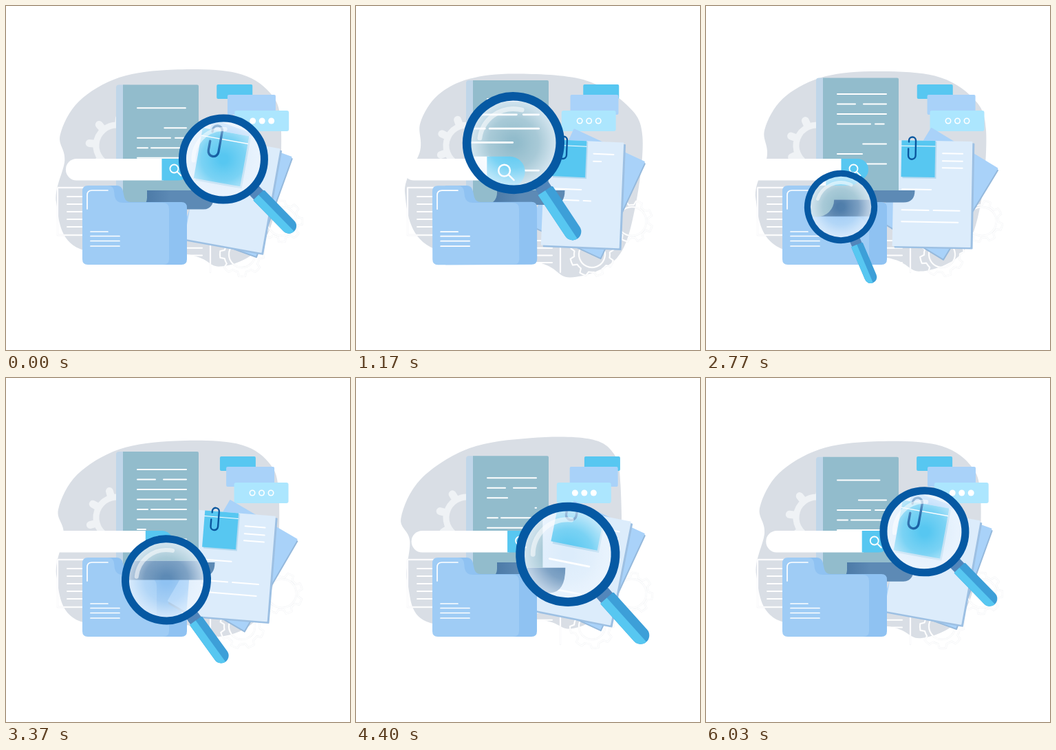
An HTML page with a canvas for the animation above (6.06 s loop, 500x500 px).

```html
<!DOCTYPE html>
<html lang="en">
<head>
<meta charset="utf-8">
<title>Document search</title>
<style>
html, body { margin: 0; width: 100%; height: 100%; overflow: hidden; background: #fff; }
canvas { display: block; width: 500px; height: 500px; }
</style>
</head>
<body>
<canvas id="stage" width="500" height="500"></canvas>
<script>
const LOOP = 6060, TAU = Math.PI * 2, RAD = Math.PI / 180;
const SKY = '#57c7f1', WHITE = '#fff';
const c = document.getElementById('stage').getContext('2d');
let now = 0;

const clamp = v => Math.max(0, Math.min(1, v));

// Oscillation with a whole number of cycles per loop; peak is a phase in degrees.
const sway = (mid, amp, peak, cycles = 1) =>
  mid + amp * Math.cos(cycles * TAU * now / LOOP - peak * RAD);

function fill(color, path) { c.fillStyle = color; c.fill(path); }
function stroke(color, width, path) {
  c.strokeStyle = color; c.lineWidth = width; c.lineCap = c.lineJoin = 'round';
  c.stroke(path);
}
function box(color, x, y, w, h, r = 0) {
  const p = new Path2D();
  p.roundRect(x, y, w, h, r);
  fill(color, p);
}
function disc(x, y, r) {
  const p = new Path2D();
  p.arc(x, y, r, 0, TAU);
  return p;
}
function placed(x, y, degrees, draw) {
  c.save();
  c.translate(x, y);
  c.rotate(degrees * RAD);
  draw();
  c.restore();
}

// A text row of segments, visible between two fractions of its span.
function row(spans, y, from, to, width = 2) {
  const x0 = spans[0][0], size = spans[spans.length - 1][1] - x0;
  for (const [a, b] of spans) {
    const left = Math.max(a, x0 + size * from), right = Math.min(b, x0 + size * to);
    if (right > left) stroke(WHITE, width, new Path2D(`M${left} ${y}H${right}`));
  }
}

// Outline points of the backdrop: x, y and how far each one sways.
const BLOB = [
  [80, 186, 15, -18], [107, 138, 13, -9], [165, 104, 0, 2], [243, 93, -11, 6],
  [334, 98, -4, 10], [384, 127, 10, 18], [401, 173, 17, 18], [395, 285, 12, 8],
  [368, 354, 12, 14], [312, 380, 0, 16], [262, 362, 0, 11], [108, 353, 0, -3],
  [73, 285, -2, -14], [86, 223, 8, -14]
];
function blob() {
  const s = sway(0, 1, 95), n = BLOB.length;
  const at = i => {
    const [x, y, dx, dy] = BLOB[(i + n) % n];
    return [x + dx * s, y + dy * s];
  };
  const p = new Path2D();
  p.moveTo(...at(0));
  for (let i = 0; i < n; i++) {
    const [a, b, d, e] = [at(i - 1), at(i), at(i + 1), at(i + 2)];
    p.bezierCurveTo(b[0] + (d[0] - a[0]) / 6, b[1] + (d[1] - a[1]) / 6,
      d[0] - (e[0] - b[0]) / 6, d[1] - (e[1] - b[1]) / 6, ...d);
  }
  fill('#d9dee5', p);
}

function solidGear() {
  placed(161, 203, 5 - 360 * now / LOOP, () => {
    stroke('#eff2f5', 9, disc(0, 0, 30));
    for (let i = 0; i < 8; i++) {
      c.rotate(TAU / 8);
      stroke('#eff2f5', 11, new Path2D('M34 0H40'));
    }
  });
}
function outline(path) {
  stroke('#eef0f3', 2.4, path);
  stroke(WHITE, 1.6, path);
}
function lineGear(x, y, r, hole, turn) {
  placed(x, y, turn * 360 * now / LOOP, () => {
    const p = new Path2D();
    for (let i = 0; i < 8; i++) {
      const mid = i * TAU / 8;
      p.arc(0, 0, r + 6, mid - .15, mid + .15);
      p.arc(0, 0, r, mid + .24, mid + TAU / 8 - .24);
    }
    p.closePath();
    outline(p);
    outline(disc(0, 0, hole));
  });
}
function backdrop() {
  blob();
  solidGear();
  lineGear(401, 313, 24, 21, -1);
  lineGear(343, 361, 26, 19, 1);
  outline(new Path2D('M130 264H75V333H130M297 340V387'));
  for (let i = 0; i < 5; i++) row([[89, 125]], 277 + i * 11, 0, 1);
  for (let i = 0; i < 4; i++) row([[240, 285]], 341 + i * 10.7, 0, 1);
}

function bubbles() {
  box(SKY, sway(319, 13, 169, 2), 114, 52, 21, 2);
  box('#a9d2f9', sway(316.3, 5.7, -8, 2), 129, 70, 29, 2);
  const x = sway(310.5, 22.8, 18, 2), phase = now % (LOOP / 3);
  box('#ace6fe', x, 152, 79, 30, 3);
  for (let i = 0; i < 3; i++) {
    const cx = x + 26.5 + 13.5 * i, t = phase - 60 * i;
    const open = clamp((t - 400) / 200) - clamp((t - 1350) / 200);
    fill(WHITE, disc(cx, 167, 4.5));
    if (open > 0) fill('#ace6fe', disc(cx, 167, 2.9 * open));
  }
}

function pages() {
  const sheet = (color, shade, dx, dy) => {
    box(shade, dx - 57, dy - 77, 114, 154, 1);
    box(color, -57, -77, 114, 154, 1);
  };
  placed(336, 272, sway(25.5, 5.8, 165), () => sheet('#a9d2f9', '#95b9dc', 2, 2));
  placed(329, 273, sway(6.3, -6.8, 125), () => {
    sheet('#dcecfb', '#9dc0e3', 3, 2.5);
    const gone = clamp((now - 5050) / 850);
    const head = (now - 300) / 630, body = now / 700;
    [-59, -48, -38].forEach((y, i) => row([[14, 43]], y, gone, clamp(head - i)));
    row([[-44, -2]], -6, gone, clamp(body));
    row([[-44, -5], [2, 40]], 24 - 16 * clamp((1700 - now) / 600), gone, clamp(body - 1));
    row([[-44, 38]], 41, gone, clamp(body - 2));
    box('#b5d9f0', -44, -76, 49, 54);
    box('#57c7f1', -46, -77, 49, 53);
    row([[-46, 3]], -69, 0, 1, 1);
    stroke('#0a579f', 2.4, new Path2D('M-36-65V-55a5.3 5.3 0 0 0 10.6 0V-77a5 5 0 0 0-10 0V-75'));
  });
}

const FULL = [[191, 262]];
const ROWS = [
  FULL, [[191, 217], [229, 262]], FULL, [[191, 239], [246, 262]],
  [[191, 206], [211, 262]], FULL, [[191, 227]], FULL
];
function scroll() {
  const top = sway(110, -6, 140), end = top + 181;
  box('#c0d6e9', 160, top, 20, 160, [4, 0, 0, 4]);
  const g = c.createLinearGradient(205, 0, 240, 0);
  g.addColorStop(0, '#4d7ba8');
  g.addColorStop(1, '#5d8ab5');
  fill(g, new Path2D(`M203 268H303.5Q303.5 ${end} 287 ${end}H187Z`));
  fill('#92bccc', new Path2D(`M170 ${top}H278q2 0 2 2V268H205V${end - 17}a17.5 17.5 0 0 1-35 0Z`));
  // Typing runs down the rows while erasing runs a little ahead of it.
  const typed = 24 * now / LOOP + .98;
  ROWS.forEach((spans, i) => {
    const u = (typed - i + 8) % 8;
    row(spans, 127 + 14.5 * i + (top - 104) * 2, clamp(u - 6.43), clamp(u));
  });
}

function searchBar() {
  const x = sway(212.5, -17, 145);
  box(WHITE, x - 139.5, 222, 142, 31.5, [15.7, 0, 0, 15.7]);
  box(SKY, x, 222, 39.5, 31.5, [0, 15.7, 15.7, 0]);
  stroke(WHITE, 1.8, disc(x + 18, 236.5, 6));
  stroke(WHITE, 1.8, new Path2D(`M${x + 22.5} 241l5.5 5.5`));
}

function folder() {
  const lift = Math.sin(Math.PI * clamp((now % (LOOP / 2) - 430) / 800)) ** 2;
  placed(200, 280, -2.8 * lift, () => {
    c.translate(-200, -280);
    fill('#8fc2f2', new Path2D('M130 261H161q7 0 9 8l2 9q2 7 9 7H255q8 0 8 8V368q0 8-8 8H130Z'));
    fill('#9fccf5', new Path2D('M119 261H148q8 0 9 8l1 8q2 9 12 9H228q9 0 9 9V368q0 8-9 8H119q-8 0-8-8V269q0-8 8-8Z'));
    stroke(WHITE, 1.7, new Path2D('M118 295V275q0-7 7-7H148'));
    row([[123, 148]], 328, 0, 1, 1.7);
    for (const y of [334.5, 341.5, 349]) row([[123, 165]], y, 0, 1, 1.7);
  });
}

// Stops of the magnifier: time, x, y, radius, handle angle, centre of enlargement.
const STOPS = [
  [0, 316, 222.5, 65, 45.6, 326, 219],
  [1170, 229, 199, 74, 56.3, 253, 230],
  [1800, 163.5, 297, 56, 29.5, 202, 283],
  [2770, 196, 292, 53, 67, 252, 235],
  [3200, 222, 304, 61, 62, 275, 263],
  [3870, 266, 254, 75, 32.3, 297, 293],
  [4970, 340.5, 262, 73, 66.5, 305, 200]
];
// Smooth cyclic curve through the stops.
function glide() {
  const n = STOPS.length;
  const at = i => STOPS[(i + n) % n].map((v, k) => k ? v : v + LOOP * Math.floor(i / n));
  const i = STOPS.findLastIndex(s => s[0] <= now);
  const [a, b, d, e] = [at(i - 1), at(i), at(i + 1), at(i + 2)];
  const h = d[0] - b[0], u = (now - b[0]) / h;
  return b.map((v, k) => {
    const rise = d[k] - v;
    const m = (d[k] - a[k]) / (d[0] - a[0]) * h, q = (e[k] - v) / (e[0] - b[0]) * h;
    return v + u * (m + u * (3 * rise - 2 * m - q + u * (m + q - 2 * rise)));
  });
}

function magnifier() {
  const [, x, y, r, angle, fx, fy] = glide();
  placed(x, y, angle, () => {
    c.scale(r / 65, r / 65);
    box('#5286bb', 60, -9.5, 16, 19);
    box('#3d9fd8', 73, -11, 74, 22, [2, 11, 11, 2]);
    fill(SKY, new Path2D('M73 0H147A11 11 0 0 1 136 11H73Z'));
  });

  c.save();
  c.clip(disc(x, y, r - 4));
  c.fillStyle = '#e9f1fa';
  c.fillRect(0, 0, 500, 500);
  c.save();
  c.translate(fx, fy);
  c.scale(1.4, 1.4);
  c.translate(-fx, -fy);
  [folder, pages, scroll, searchBar].forEach(draw => draw());
  c.restore();
  const fog = c.createRadialGradient(x, y, r * .1, x, y, r * .88);
  fog.addColorStop(0, 'rgba(255,255,255,0)');
  fog.addColorStop(.5, 'rgba(246,250,255,.22)');
  fog.addColorStop(1, 'rgba(238,246,255,.76)');
  c.fillStyle = fog;
  c.fillRect(0, 0, 500, 500);
  c.restore();

  placed(x, y, angle, () => {
    c.scale(r / 65, r / 65);
    const shine = new Path2D();
    shine.arc(0, 0, 43.5, 132 * RAD, 228 * RAD);
    stroke('rgba(255,255,255,.55)', 6, shine);
    stroke('#0659a3', 11, disc(0, 0, 59.5));
  });
}

function frame(time) {
  now = time % LOOP;
  c.fillStyle = WHITE;
  c.fillRect(0, 0, 500, 500);
  [backdrop, bubbles, pages, scroll, searchBar, folder, magnifier].forEach(draw => draw());
  requestAnimationFrame(() => frame(performance.now() - start));
}
const start = performance.now();
frame(0);
</script>
</body>
</html>
```
